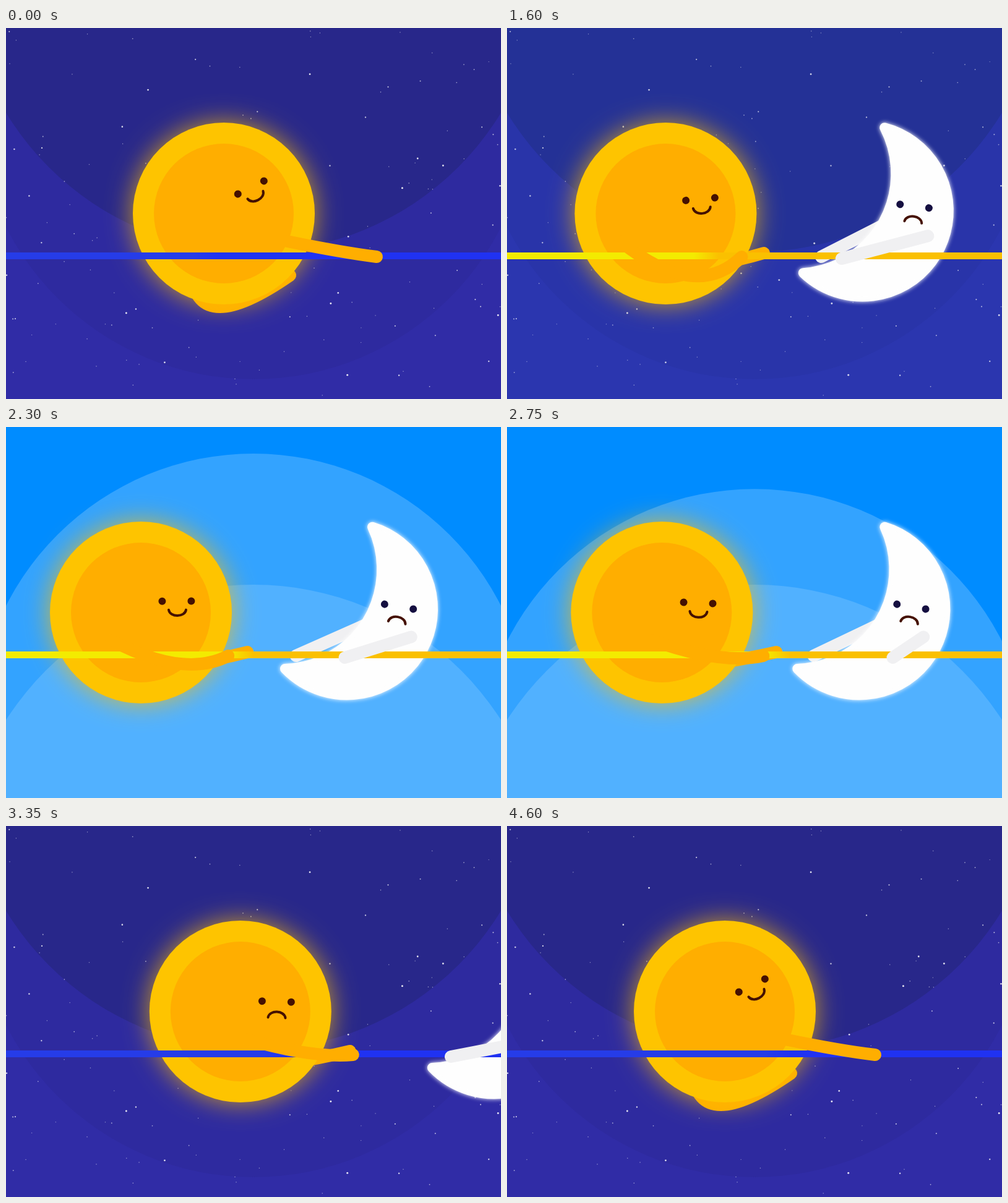
An HTML page with a canvas for the animation above (4.65 s loop, 800 px wide and 600 px high).

```html
<!DOCTYPE html>
<html lang="en">
<head>
<meta charset="utf-8">
<title>Sun and moon tug of war</title>
<style>
html, body { margin: 0; width: 100%; height: 100%; overflow: hidden; background: #302ca6; }
canvas { display: block; width: 100vw; height: 100vh; }
</style>
</head>
<body>
<canvas id="stage" width="800" height="600"></canvas>
<script>
const ctx = document.getElementById('stage').getContext('2d');
const LOOP = 4650, TAU = Math.PI * 2, RAD = Math.PI / 180;
const DAY = [0, 140, 255], ORANGE = '#ffae00', PALE = '#f0f0f2';

const ramp = (t, start, span) => Math.min(1, Math.max(0, (t - start) / span));
const smooth = u => u * u * (3 - 2 * u);
const easeOut = u => 1 - (1 - u) ** 2;
const lerp = (a, b, u) => a + (b - a) * u;
const mix = (a, b, u) => `rgb(${a.map((v, i) => lerp(v, b[i], u))})`;
const pulse = (t, on, onSpan, off, offSpan) =>
  smooth(ramp(t, on, onSpan)) - smooth(ramp(t, off, offSpan));

// Eases through [time, value] points, holding before the first and after the last.
const ease = (t, ...points) => points.reduce((value, [end, next], i) => {
  if (!i) return next;
  const [begin, previous] = points[i - 1];
  return value + (next - previous) * smooth(ramp(t, begin, end - begin));
}, 0);

const turn = (x, y, deg) => {
  const c = Math.cos(deg * RAD), s = Math.sin(deg * RAD);
  return [x * c - y * s, x * s + y * c];
};

function disc(x, y, r, fill) {
  ctx.beginPath();
  ctx.arc(x, y, r, 0, TAU);
  ctx.fillStyle = fill;
  ctx.fill();
}

let seed = 11;
const random = () => (seed = seed * 16807 % 2147483647) / 2147483647;
const stars = Array.from({ length: 150 }, () => {
  const glint = random() ** 3;
  return { x: random() * 800, y: random() * 600, r: 0.7 + 0.8 * glint, alpha: 0.5 + 0.4 * glint };
});

function drawSky(t, day) {
  ctx.fillStyle = mix([48, 44, 166], DAY, day);
  ctx.fillRect(0, 0, 800, 600);
  if (day < 1) {
    disc(400, 120, 448, mix([46, 42, 159], DAY, day));
    disc(400, -106, 468, mix([40, 39, 138], DAY, day));
    for (const { x, y, r, alpha } of stars) {
      ctx.globalAlpha = alpha * (1 - day);
      disc(x, y, r, '#fff');
    }
  }
  const hill = (rise, fall, top, r, white) => {
    const y = 620 - (620 - top) * (easeOut(ramp(t, rise, 450)) - ramp(t, fall, 400) ** 2);
    disc(400, y + r, r, `rgba(255,255,255,${white})`);
  };
  ctx.globalAlpha = day;
  hill(1750, 2625, 43, 448, 0.2);
  hill(1850, 2750, 255, 475, 0.15);
  ctx.globalAlpha = 1;
}

function drawFace(x, y, tilt, mood, eyeColor) {
  ctx.save();
  ctx.translate(x, y);
  ctx.rotate(tilt * RAD);
  disc(-23.5, 0, 6, eyeColor);
  disc(23.5, 0, 6, eyeColor);
  const ends = 20 - 6 * mood, bend = ends + 12.5 * mood;
  ctx.beginPath();
  ctx.moveTo(-13, ends);
  ctx.bezierCurveTo(-11, bend, 13, bend, 15, ends);
  ctx.lineWidth = 4;
  ctx.lineCap = 'round';
  ctx.strokeStyle = '#451102';
  ctx.stroke();
  ctx.restore();
}

function drawSun(x, tilt, mood) {
  ctx.save();
  ctx.shadowColor = 'rgba(255,190,0,.75)';
  ctx.shadowBlur = 40;
  disc(x, 300, 147, '#fec400');
  ctx.restore();
  disc(x, 300, 113, ORANGE);
  const [fx, fy] = turn(58, -18, tilt);
  drawFace(x + fx, 300 + fy, tilt, mood, '#451102');
}

// Crescent between two circles; the inset leaves room for a rounding stroke.
function crescent(inset) {
  const outer = 147 - inset, inner = 153 + inset, gap = 123;
  const a = (outer ** 2 - inner ** 2 + gap ** 2) / (2 * gap);
  const h = Math.sqrt(outer ** 2 - a ** 2);
  const tip = Math.atan2(h, -a), notch = Math.atan2(h, gap - a);
  const path = new Path2D();
  path.arc(0, 0, outer, -tip, tip);
  path.arc(-gap, 0, inner, notch, -notch, true);
  path.closePath();
  return path;
}
const moonBody = crescent(8);

function drawMoon(x, y, tilt, mood) {
  ctx.save();
  ctx.translate(x, y);
  ctx.rotate(tilt * RAD);
  ctx.fillStyle = ctx.strokeStyle = '#fefefe';
  ctx.lineWidth = 16;
  ctx.lineJoin = 'round';
  ctx.shadowColor = '#fff';
  ctx.shadowBlur = 7;
  ctx.stroke(moonBody);
  ctx.shadowBlur = 0;
  ctx.fill(moonBody);
  ctx.restore();
  const [fx, fy] = turn(69.5, -47.4, tilt);
  drawFace(x + fx, y + fy, tilt - 22, mood, '#150f40');
}

function drawRope(edge, day) {
  const paint = ctx.createLinearGradient(edge - 20, 0, edge + 20, 0);
  paint.addColorStop(0, mix([38, 60, 232], [243, 235, 0], day));
  paint.addColorStop(1, mix([32, 50, 242], [250, 192, 0], day));
  ctx.fillStyle = paint;
  ctx.fillRect(0, 363, 800, 11);
}

function drawArm(color, x0, y0, cx, cy, x1, y1) {
  ctx.beginPath();
  ctx.moveTo(x0, y0);
  ctx.quadraticCurveTo(cx, cy, x1, y1);
  ctx.strokeStyle = color;
  ctx.lineWidth = 20;
  ctx.lineCap = 'round';
  ctx.stroke();
}

// The shoulder follows the reach, and a shorter reach sags more.
function drawSunNearArm(x, reach) {
  const shoulder = 1.42 * reach - 248;
  const sag = 80 * (125 / reach) ** 4;
  drawArm(ORANGE, x + shoulder, 345, x + lerp(shoulder, reach, 0.62), 358 + sag, x + reach, 370);
}

// Hangs beneath the body when at rest, reaches for the rope when gripping.
function drawSunFarArm(x, reach, grip) {
  drawArm(ORANGE, x - 52, 400, x + lerp(-40, 78, grip), lerp(502, 388, grip),
    x + reach, lerp(400, 364, grip));
}

function draw(t) {
  const day = pulse(t, 1550, 260, 2950, 300);
  const ropeDay = pulse(t, 1200, 350, 2900, 350);
  const mood = 1 - 2 * pulse(t, 2850, 350, 4350, 200);

  const sunX = ease(t, [780, 352], [2050, 218], [2450, 218], [3550, 394], [4250, 394], [4600, 352]);
  const sunTilt = ease(t, [850, -26.6], [1700, -4.5], [2750, 2.4], [4250, 1], [4600, -26.6]);
  const sunNear = ease(t, [0, 247], [750, 128], [1900, 122], [2750, 164], [3350, 182], [4600, 243], [LOOP, 247]);
  const sunFar = ease(t, [0, 107], [700, 220], [1750, 155], [2750, 185], [3900, 170], [4400, 107]);
  const sunGrip = pulse(t, 0, 500, 3900, 500);

  const moonX = 972 - 421 * easeOut(ramp(t, 0, 2100)) + 440 * ramp(t, 2520, 1130) ** 2;
  const lean = smooth(ramp(t, 750, 1050));
  const moonY = lerp(306, 294.5, lean), moonTilt = lerp(6.3, 31.6, lean);
  const moonNear = ease(t, [750, -50], [1600, -34], [1900, -52], [2750, 54], [3350, -70]);
  const moonFar = ease(t, [750, -117], [1600, -67], [1850, -91], [2750, -74], [3350, -5]);
  const drawMoonArm = (shoulderX, shoulderY, reach, handY) => {
    const [sx, sy] = turn(shoulderX, shoulderY, moonTilt);
    const hand = moonX + reach;
    drawArm(PALE, moonX + sx, moonY + sy, hand, handY, hand, handY);
  };

  drawSky(t, day);
  drawSunFarArm(sunX, sunFar, sunGrip);
  drawMoonArm(47, -6, moonFar, 370);
  drawSun(sunX, sunTilt, mood);
  drawMoon(moonX, moonY, moonTilt, -mood);
  drawRope(ease(t, [1850, 322], [2750, 437]), ropeDay);
  drawSunNearArm(sunX, sunNear);
  drawMoonArm(112, -16, moonNear, 373);
}

const start = performance.now();
function frame() {
  draw((performance.now() - start) % LOOP);
  requestAnimationFrame(frame);
}
frame();
</script>
</body>
</html>
```
